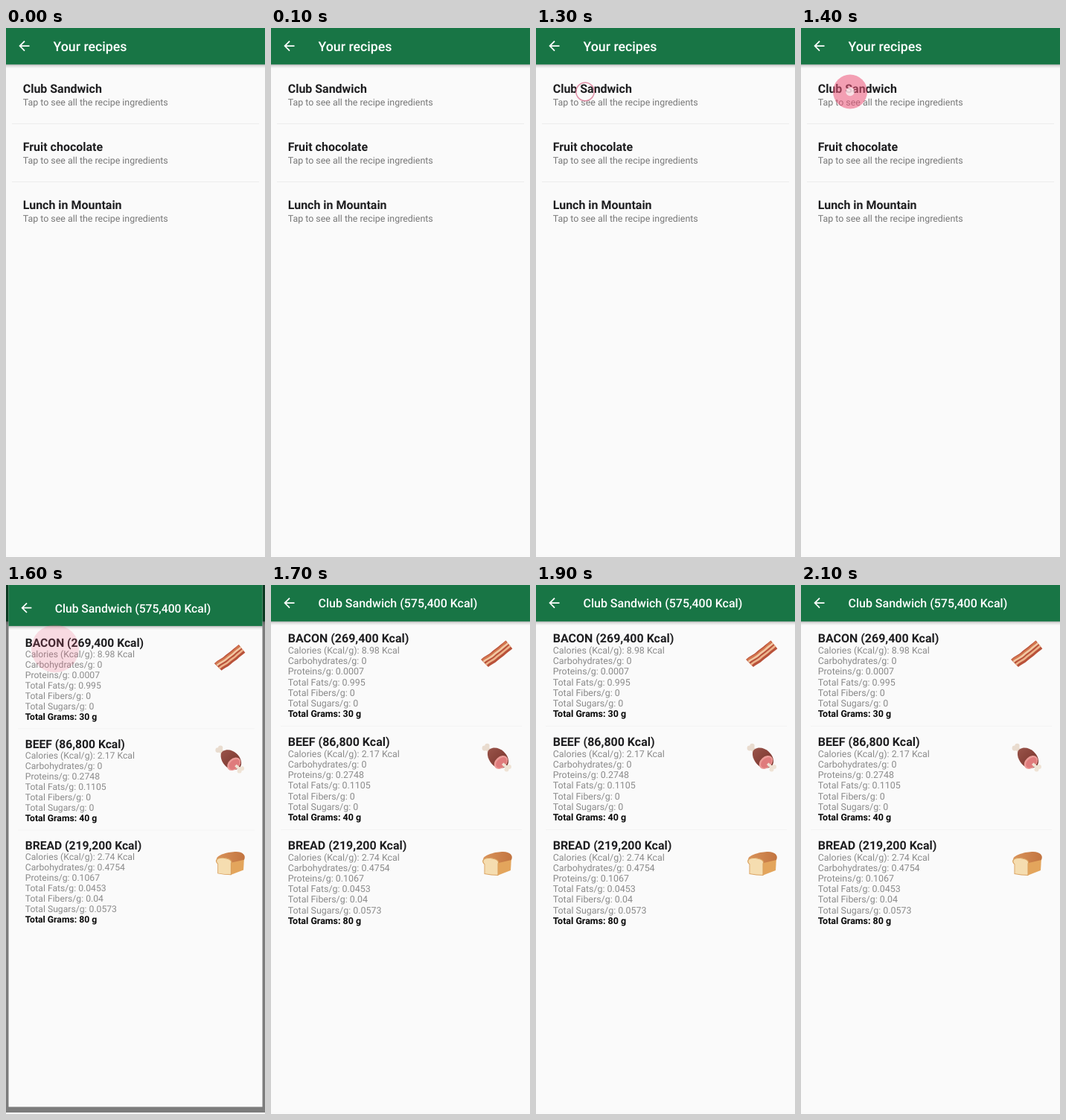
An HTML page for the animation above (2.5 s loop, 348 by 710 pixels).

```html
<!DOCTYPE html>
<html lang="en">
<head>
<meta charset="utf-8">
<title>Recipes</title>
<style>
html, body { margin: 0; width: 100%; height: 100%; overflow: hidden; background: #fafafa; }
svg { display: block; width: 100vw; height: 100vh; }
text { font-family: Roboto, sans-serif; font-size: 12.43px; text-rendering: geometricPrecision; white-space: pre; }
.bar { font-weight: 500; fill: #fff; }
.head { font-size: 15.98px; font-weight: 700; fill: #1e1e20; }
.sub { fill: #777; }
.info { fill: #8a8a8a; }
.total { font-weight: 700; fill: #080808; }
</style>
</head>
<body>
<svg viewBox="0 0 348 710" preserveAspectRatio="none">
  <defs>
    <linearGradient id="shade" x1="0" y1="0" x2="0" y2="1">
      <stop offset="0" stop-color="#000" stop-opacity=".28"/>
      <stop offset=".45" stop-color="#000" stop-opacity=".09"/>
      <stop offset="1" stop-color="#000" stop-opacity="0"/>
    </linearGradient>
    <linearGradient id="meat" x1="0" y1="0" x2="1" y2="1">
      <stop offset="0" stop-color="#9a544a"/>
      <stop offset="1" stop-color="#743029"/>
    </linearGradient>
    <linearGradient id="crust" x1="0" y1="0" x2="1" y2="0">
      <stop offset="0" stop-color="#d9935a"/>
      <stop offset="1" stop-color="#c27440"/>
    </linearGradient>
    <clipPath id="screen"><rect width="348" height="708"/></clipPath>

    <g id="bacon" fill="none">
      <path d="M-16 12C-11 7-7 7-3 3S4-2 7-5 12-9 17-13" stroke="#b9523a" stroke-width="14"/>
      <path d="M-19 8C-14 3-9 3-5-1S2-6 5-9 9-13 13-17" stroke="#d4764f" stroke-width="2.500"/>
      <path d="M-17.500 10C-12 5-8 5-4 1S3-4 6-7 11-11 15.500-15" stroke="#f2c8a2" stroke-width="2.600"/>
      <path d="M-14.500 14C-9.500 9-5.500 9-1.500 5S5.500 0 8.500-3 14-7 18.500-11.500" stroke="#edb48c" stroke-width="2.600"/>
    </g>

    <g id="beef">
      <g fill="#e9dccf">
        <circle cx="-16" cy="-13" r="3.400"/>
        <circle cx="-12.500" cy="-16" r="3.200"/>
        <path d="M-15-11-11-15-4-8-8-4Z"/>
      </g>
      <path d="M-12-7C-11-13-3-15 4-12S17-1 16 6 8 15 1 13-13 1-12-7Z" fill="url(#meat)"/>
      <ellipse cx="6" cy="6" rx="10.500" ry="7.500" transform="rotate(-42 6 6)" fill="#eb9c98"/>
      <ellipse cx="6.500" cy="6.500" rx="8.500" ry="5.800" transform="rotate(-42 6.500 6.500)" fill="#df7b7c"/>
      <g fill="#efe3d5">
        <path d="M7 9 9.500 6.500 16 12 13 15Z"/>
        <circle cx="17" cy="12" r="3"/>
        <circle cx="13.500" cy="15.500" r="3"/>
      </g>
    </g>

    <g id="bread">
      <path d="M1-4 20-8 19 9 1 16Z" fill="#e3a55c"/>
      <path d="M-18-6C-17-12-1-16 9-16 18-16 23-11 20-5L3-1C2-7-8-9-18-6Z" fill="url(#crust)"/>
      <path d="M-16.500 14V1C-21-3-19-8-11-8S6-5 2.500 0V16Q-7 16-16.500 14Z" fill="#d99f5c"/>
      <path d="M-15.600 13.300V.500C-19.500-3-17.500-7-11-7S4.500-4.500 1.500 0V15Q-7 15-15.600 13.300Z" fill="#f5ddb0"/>
    </g>
  </defs>
  <rect width="348" height="710" fill="#fafafa"/>
  <g clip-path="url(#screen)">
    <g id="list"></g>
    <rect id="scrim" width="348" height="708"/>
    <g id="detail"></g>
    <g id="tap">
      <circle id="blob" cx="66" cy="85.500" fill="#ef567b"/>
      <circle id="ring" cx="66" cy="85.500"/>
    </g>
  </g>
</svg>
<script>
const LOOP = 2500, STEP = 100, PRESS = 1300, OPEN = 1500, DONE = 1700, LEFT = 22.7;
const $ = id => document.getElementById(id);
const text = (x, y, cls, str, extra = "") => `<text x="${x}" y="${y}" class="${cls}" ${extra}>${str}</text>`;
const rule = (x1, x2, y, color) => `<path d="M${x1} ${y}H${x2}" stroke="${color}"/>`;

const appBar = (title, size, y) => `
  <rect y="-30" width="348" height="737.500" fill="#fafafa"/>
  <rect y="48.900" width="348" height="5.500" fill="url(#shade)"/>
  <rect y="-30" width="348" height="78.900" fill="#187545"/>
  <path transform="translate(13.750 13.400) scale(.8878)" fill="#fff"
    d="M20 11H7.830l5.590-5.590L12 4l-8 8 8 8 1.410-1.410L7.830 13H20z"/>
  ${text(63.5, y, "bar", title, `style="font-size:${size}px"`)}`;

const recipes = ["Club Sandwich", "Fruit chocolate", "Lunch in Mountain"];
$("list").innerHTML = appBar("Your recipes", 17.75, 30.8) +
  recipes.map((name, i) => {
    const y = 78 * i;
    return text(LEFT, 86.7 + y, "head", name) +
      text(LEFT, 104 + y, "sub", "Tap to see all the recipe ingredients");
  }).join("") + [128.5, 206.5].map(y => rule(8, 340, y, "#ececec")).join("");

const labels = ["Calories (Kcal/g)", "Carbohydrates/g", "Proteins/g", "Total Fats/g", "Total Fibers/g", "Total Sugars/g"];
const foods = [
  { name: "BACON (269,400 Kcal)", icon: "bacon", iconY: 93, grams: 30, facts: ["8.98 Kcal", "0", "0.0007", "0.995", "0", "0"] },
  { name: "BEEF (86,800 Kcal)", icon: "beef", iconY: 232, grams: 40, facts: ["2.17 Kcal", "0", "0.2748", "0.1105", "0", "0"] },
  { name: "BREAD (219,200 Kcal)", icon: "bread", iconY: 374, grams: 80, facts: ["2.74 Kcal", "0.4754", "0.1067", "0.0453", "0.04", "0.0573"] }
];
$("detail").innerHTML = appBar("Club Sandwich (575,400 Kcal)", 15.98, 30.1) +
  foods.map((food, i) => {
    const y = 138.9 * i, line = n => 92 + y + 14.17 * n;
    return text(LEFT, 77 + y, "head", food.name) +
      labels.map((label, n) => text(LEFT, line(n), "info", `${label}: ${food.facts[n]}`)).join("") +
      text(LEFT, line(6), "total", `Total Grams: ${food.grams} g`) +
      `<use href="#${food.icon}" x="303" y="${food.iconY}"/>`;
  }).join("") + [189.5, 328.5].map(y => rule(13, 337, y, "#f3f3f3")).join("");

const set = (id, attrs) => {
  for (const key in attrs) $(id).setAttribute(key, attrs[key]);
};
const show = (id, on) => set(id, { visibility: on ? "visible" : "hidden" });
const clamp = v => Math.min(1, Math.max(0, v));
const zoom = s => `translate(174 354) scale(${s}) translate(-174 -354)`;

function draw(time) {
  const t = Math.floor(time / STEP) * STEP;
  const grow = clamp((t - PRESS) / (OPEN - PRESS));
  const open = clamp((t - OPEN) / (DONE - OPEN));

  set("scrim", { opacity: open > 0 && open < 1 ? 0.5 : 0 });
  show("detail", open > 0);
  set("detail", { transform: zoom(1 - 0.08 * (1 - open) ** 2) });

  show("tap", t >= PRESS && open < 1);
  set("blob", { r: 12 + 22 * grow - 4 * open, opacity: grow ? 0.55 * (1 - open) ** 1.5 : 0 });
  set("ring", grow
    ? { r: 2 + 7.5 * grow, fill: "#faf5f5", stroke: "none", opacity: open ? 0 : 0.75 }
    : { r: 12.2, fill: "none", stroke: "#dd829c", "stroke-width": 1.5, opacity: 0.9 });
}

const start = performance.now();
function tick() {
  draw((performance.now() - start) % LOOP);
  requestAnimationFrame(tick);
}
tick();
</script>
</body>
</html>
```
